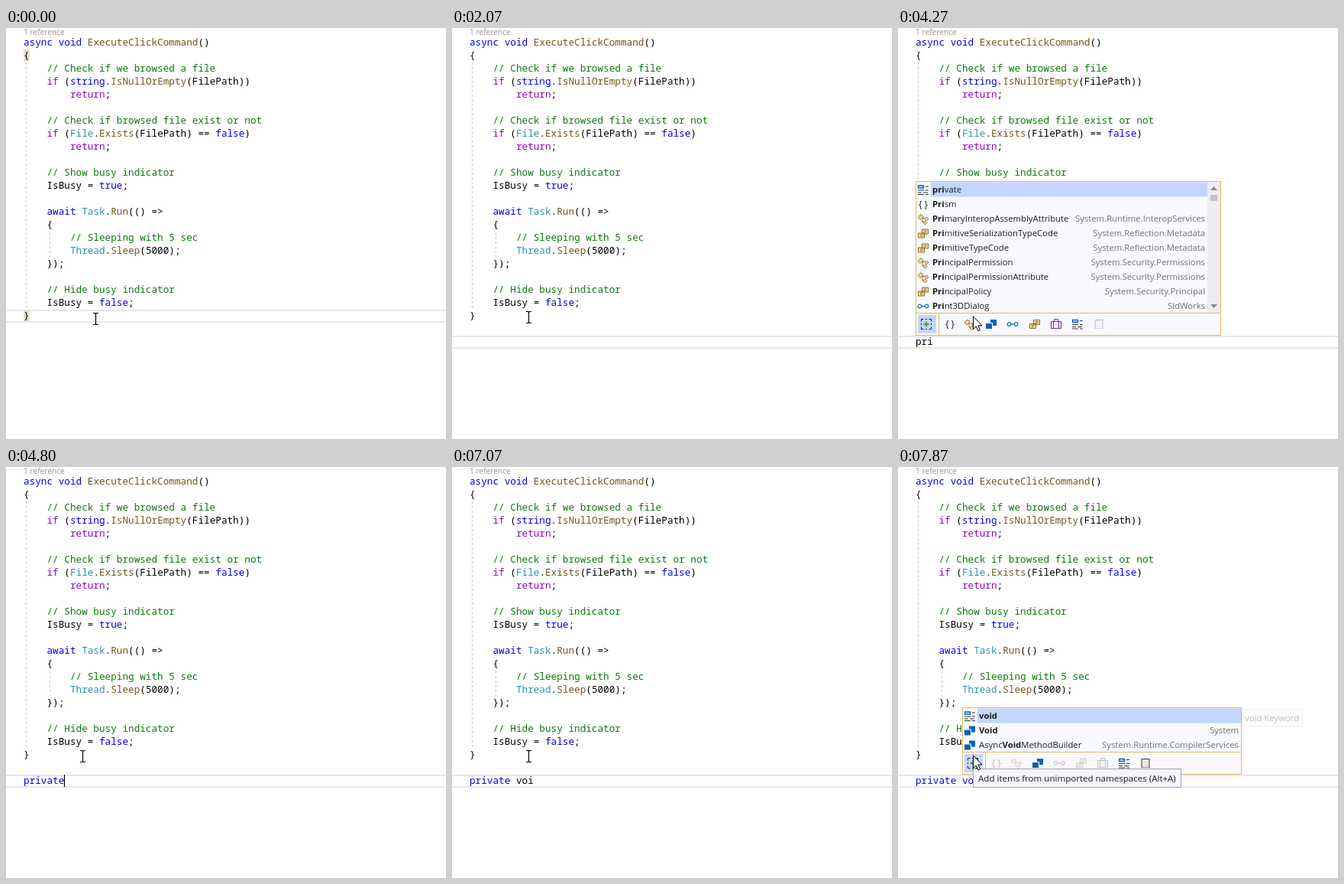
An HTML page for the animation above (8 s loop, 576 by 537 pixels).

```html
<!DOCTYPE html>
<html lang="en">
<head>
<meta charset="utf-8">
<title>Code editor with completion list</title>
<style>
  html, body { margin: 0; width: 100%; height: 100%; overflow: hidden; background: #fff; }
  svg { display: block; }
  text { white-space: pre; }
  .code { font: 500 12.7px "Noto Sans Mono", "DejaVu Sans Mono", monospace; font-variant-ligatures: none; fill: #000; }
  .ui { font: 11.3px "Open Sans", "Noto Sans", sans-serif; fill: #1e1e1e; }
  .ui tspan { font-weight: 700; }
  .lens { font-size: 10.2px; fill: #949494; }
  .space { fill: #717171; text-anchor: end; }
  .hint { font-size: 11.55px; }
  .comment { fill: #0a7a0a; }
  .flow { fill: #8f08c4; }
  .word { fill: #0000f0; }
  .type { fill: #2b91af; }
  .call { fill: #74531f; }
  .off { opacity: .3; filter: grayscale(1); }
</style>
</head>
<body>
<svg id="stage" width="576" height="537" viewBox="0 0 576 537"></svg>
<script>
const LOOP = 8000, CHAR = 7.617, LEFT = 23, ROW = 17;
const GOLD = '#e5b95c', PICK = '#c4d5ff', PANEL = '#f7f9fe';

const source = `async void ExecuteClickCommand()
{
    // Check if we browsed a file
    if (string.IsNullOrEmpty(FilePath))
        return;

    // Check if browsed file exist or not
    if (File.Exists(FilePath) == false)
        return;

    // Show busy indicator
    IsBusy = true;

    await Task.Run(() =>
    {
        // Sleeping with 5 sec
        Thread.Sleep(5000);
    });

    // Hide busy indicator
    IsBusy = false;
}`.split('\n');

const tokens = new RegExp([
  '(?<comment>//.*)',
  '\\b(?<flow>if|return)\\b',
  '\\b(?<word>async|void|string|await|true|false|private)\\b',
  '\\b(?<type>File|Task|Thread)\\b',
  '\\b(?<call>ExecuteClickCommand|IsNullOrEmpty|Exists|Run|Sleep)\\b'
].join('|'), 'g');

const paint = line => line.replace(/>/g, '&gt;').replace(tokens, (match, ...rest) => {
  const groups = rest[rest.length - 1];
  const kind = Object.keys(groups).find(name => groups[name]);
  return `<tspan class="${kind}">${match}</tspan>`;
});

const rect = (x, y, w, h, fill, extra = '') =>
  `<rect x="${x}" y="${y}" width="${w}" height="${h}" fill="${fill}" ${extra}/>`;
const path = (d, stroke, fill = 'none', extra = '') =>
  `<path d="${d}" stroke="${stroke}" fill="${fill}" ${extra}/>`;
const label = (x, y, text, cls = '') => `<text class="ui ${cls}" x="${x}" y="${y}">${text}</text>`;
const codeLine = (row, html) =>
  `<text class="code" x="${LEFT}" y="${23 + row * ROW}">${html}</text>`;

// Icons are drawn around their own centre.
const icons = {
  all: path('M-6.5-3.5v-3h3M3.5-6.5h3v3M6.5 3.5v3h-3M-3.5 6.5h-3v-3M-6.5-1v2M6.5-1v2M-1-6.5h2M-1 6.5h2', '#222')
    + path('M-3.5 0h7M0-3.5v7', '#2f8a3c', 'none', 'stroke-width="1.5"'),
  n: '<text class="ui" x="0" y="4" text-anchor="middle" style="font-size:12px">{ }</text>',
  c: path('M-7-2l4-4 3 3-4 4zM2 0l2.5-2.5 2.5 2.5-2.5 2.5zM0 5l2.5-2.5 2.5 2.5-2.5 2.5z', '#8c6a1e', '#e8d9b0')
    + path('M-1-1h3M-1-1v5h2', '#8c6a1e'),
  t: rect(-1, -6, 8, 8, '#0a62bd') + rect(-7, -2, 9, 8, '#fff') + rect(-7, -1, 8, 7, '#0f5fb0'),
  i: '<g fill="#fff" stroke="#1673bd" stroke-width="1.3"><circle cx="-4.5" r="2.3"/><circle cx="4.5" r="2.3"/><path d="M-2.2 0h4.4"/></g>',
  e: path('M-1.5-5.5h8v6h-8zM-6.5-.5h8v6h-8z', '#8c6a1e', '#f4e6b8')
    + path('M.5-3.5h4M.5-1.5h4M-4.5 1.5h4M-4.5 3.5h4', '#8c6a1e'),
  d: path('M-6.5-3.5h13v9h-13zM-2.5-3.5v-3h5v3M-3.5-3.5v9M3.5-3.5v9', '#7032a0', '#f2e8f8'),
  k: path('M-6.5-5.5h7v3h-7z', '#0a62bd', '#cfe4f7', 'stroke-width="1.3"')
    + path('M3-4.5h4M-7 .5h8M3 .5h4M-7 3.5h5M0 3.5h6M-7 6h8M3 6h4', '#333'),
  s: rect(-5, -6, 10, 11, '#e6e6ea') + path('M-5 5.5v-11h10v11', '#333')
    + path('M-5 5.5h11', '#333', 'none', 'stroke-dasharray="1 1"')
};
const icon = (name, x, y, off) =>
  `<g transform="translate(${x} ${y})"${off ? ' class="off"' : ''}>${icons[name]}</g>`;

// Each item: icon, name and an optional note on the right.
const lists = {
  p: { x: 23, w: 256, sel: 1, match: 'p', off: '', scroll: true, tip: 'private Keyword', tipW: 92,
    items: ['k partial', 'k private', 's prop property', 's propa', 's propdp', 's propfull', 's propg', 's propp', 'k protected'] },
  pri: { x: 23, w: 400, sel: 0, match: 'pri', off: 's', scroll: true, tip: 'private Keyword', tipW: 92,
    items: ['k private', 'n Prism',
      'c PrimaryInteropAssemblyAttribute System.Runtime.InteropServices',
      'e PrimitiveSerializationTypeCode System.Reflection.Metadata',
      'e PrimitiveTypeCode System.Reflection.Metadata',
      'c PrincipalPermission System.Security.Permissions',
      'c PrincipalPermissionAttribute System.Security.Permissions',
      'e PrincipalPolicy System.Security.Principal',
      'i Print3DDialog SldWorks'] },
  voi: { x: 84, w: 366, sel: 0, match: 'voi', off: 'nid', scroll: true, tip: 'void Keyword', tipW: 80,
    items: ['k void', 't Void System',
      't AsyncVoidMethodBuilder System.Runtime.CompilerServices',
      'e VoiceAge System.Speech.Synthesis',
      'c VoiceChangeEventArgs System.Speech.Synthesis',
      'e VoiceGender System.Speech.Synthesis',
      'c VoiceInfo System.Speech.Synthesis',
      'c InstalledVoice System.Speech.Synthesis',
      's void'] },
  void: { x: 84, w: 366, sel: 0, match: 'void', off: 'ncied', tip: 'void Keyword', tipW: 80,
    items: ['k void', 't Void System', 't AsyncVoidMethodBuilder System.Runtime.CompilerServices'] }
};

function popup(list, tipAlpha, hover) {
  const { x, w, items, match, off, scroll } = list;
  const top = 372.5 - items.length * 19, right = x + w - (scroll ? 18 : 1);
  let out = rect(x + .5, top - 1, w - 1, 402.5 - top, PANEL, `stroke="${GOLD}"`);
  out += rect(x + 20, top + list.sel * 19, right - x - 20, 19, PICK);
  items.forEach((item, i) => {
    const [kind, name, note = ''] = item.split(' ');
    const y = top + i * 19;
    out += icon(kind, x + 10, y + 10);
    out += label(x + 22, y + 13.5, name.replace(new RegExp(match, 'i'), '<tspan>$&</tspan>'));
    out += label(right - 3, y + 13.5, note, 'space');
  });
  if (scroll) {
    const mid = right + 8.5;
    out += rect(right, top, 17, 170.5, '#ececf2') + rect(mid - 4.5, 218, 9, 8, '#c2c3c9')
      + path(`M${mid - 4.5} 212l4.5-5 4.5 5zM${mid - 4.5} 361l4.5 5 4.5-5z`, 'none', '#868999');
  }
  out += path(`M${x} 372.5h${w}M${x + 30.5} 373v29`, GOLD);
  out += rect(x + 3, 375, 24, 24, PICK);
  if (hover) out += rect(x + 61, 375, 24, 24, PICK);
  ['all', ...'nctiedks'].forEach((name, i) => {
    out += icon(name, x + 14 + Math.round(i * 28.3) + (i === 1 ? 3 : 0), 387, off.includes(name));
  });
  if (tipAlpha) {
    const tipX = x + w, tipY = Math.round(top + list.sel * 19);
    out += `<g opacity="${tipAlpha}">` + rect(tipX + .5, tipY + .5, list.tipW - 1, 22, '#f7f7f9', 'stroke="#cccedb"')
      + label(tipX + 4, tipY + 15.5, list.tip) + '</g>';
  }
  return out;
}

function pointer([x, y], arrow) {
  if (arrow) return path('M98.5 377v16.5l3.8-3.6 2.6 6 2.6-1.1-2.6-5.9h5.2z', '#000', '#fff');
  return path(`M${x - 3} ${y - 7.5}h2.5l1 1 1-1H${x + 4}M${x + .5} ${y - 6.5}v13M${x - 3} ${y + 7.5}h2.5l1-1 1 1H${x + 4}`, '#000', 'none', 'stroke-width="1.2"');
}

// Changes over time; each step keeps what it does not mention.
const steps = [
  [0, { row: 21, col: 1, caret: false, text: '', plain: false, brace: true, mouse: [117, 380],
        arrow: false, list: '', tip: 0, hover: false, hint: false }],
  [70, { mouse: [113, 380] }],
  [130, { mouse: [107, 379] }],
  [200, { mouse: [102, 378] }],
  [330, { mouse: [100, 378] }],
  [530, { caret: true }],
  [1000, { caret: false }],
  [1400, { row: 22, col: 0, caret: true }],
  [1470, { brace: false }],
  [1600, { row: 23 }],
  [2070, { caret: false }],
  [2730, { text: 'p', caret: true }],
  [3200, { text: 'pr' }],
  [3470, { list: 'p', arrow: true, hover: true }],
  [3600, { tip: .3 }],
  [3670, { tip: .65 }],
  [3730, { tip: 1 }],
  [4200, { caret: false }],
  [4270, { text: 'pri', list: 'pri', tip: 0, hover: false }],
  [4330, { tip: .25, caret: true }],
  [4400, { tip: .5 }],
  [4470, { tip: .75 }],
  [4530, { tip: 1 }],
  [4670, { text: 'private', plain: true, list: '', tip: 0 }],
  [4730, { plain: false }],
  [4800, { arrow: false }],
  [5400, { caret: false }],
  [5470, { text: 'private ', caret: true }],
  [6070, { text: 'private vo' }],
  [6470, { text: 'private voi' }],
  [7070, { caret: false }],
  [7130, { list: 'voi', arrow: true }],
  [7270, { tip: .3 }],
  [7330, { tip: .65 }],
  [7400, { tip: 1 }],
  [7530, { text: 'private void', caret: true }],
  [7670, { hint: true }],
  [7800, { list: 'void', tip: 0 }],
  [7870, { tip: .28 }]
];

const guides = path('M26.5 45V368M57.5 267V299', '#c6c6c6', 'none', 'stroke-dasharray="3 3"');
const listing = label(LEFT, 9, '1 reference', 'lens') + guides
  + source.map((line, i) => codeLine(i, paint(line))).join('');

function draw(s) {
  const y = 12 + s.row * ROW, col = s.row === 23 ? s.text.length : s.col;
  let out = rect(-2, y, 580, 15, 'none', 'stroke="#e6e7f2" stroke-width="2"');
  if (s.brace) out += rect(23, 28, 7.6, 16, '#e5ddd0') + rect(23, 368, 7.6, 16, '#e5ddd0');
  out += listing + codeLine(23, s.plain ? s.text : paint(s.text));
  if (s.caret) out += rect(22.6 + col * CHAR, y - 1, 1.2, 16, '#000');
  if (s.list) out += popup(lists[s.list], s.tip, s.hover);
  if (s.hint) out += rect(98.5, 394.5, 272, 24, '#f3f3f9', 'stroke="#a0a2b0"')
    + label(105, 411, 'Add items from unimported namespaces (Alt+A)', 'hint');
  return out + pointer(s.mouse, s.arrow);
}

const stage = document.getElementById('stage');
const begin = performance.now();
let shown = -1;

function tick() {
  const t = Math.max(0, performance.now() - begin) % LOOP;
  const past = steps.filter(([at]) => at <= t);
  if (past.length !== shown) {
    shown = past.length;
    stage.innerHTML = draw(Object.assign({}, ...past.map(step => step[1])));
  }
  requestAnimationFrame(tick);
}
tick();
</script>
</body>
</html>
```
